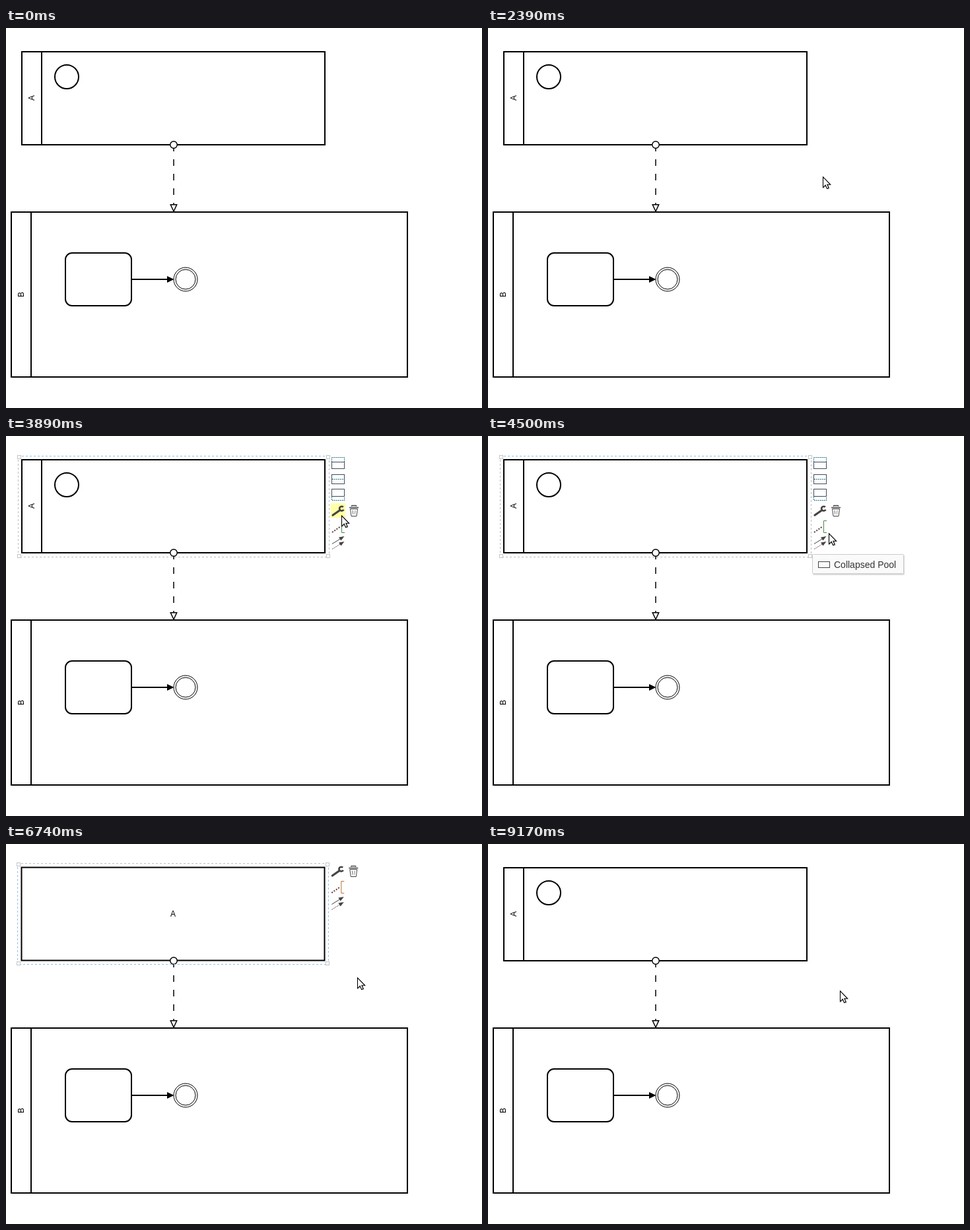
Animation, 721 px wide and 576 px high, one loop 9870 ms. Source, as an HTML page:

```html
<!DOCTYPE html>
<html lang="en">
<head>
<meta charset="utf-8">
<title>Collapsing a pool</title>
<style>
  html, body { margin: 0; width: 100%; height: 100%; overflow: hidden; background: #fff; }
  svg { display: block; width: 721px; height: 576px; }
  text { font-family: "Liberation Sans", Arial, sans-serif; font-size: 12px; }
  .shape { fill: #fff; stroke: #000; stroke-width: 2; }
  .thin { stroke-width: 1; }
  .flow { stroke-width: 1.5; }
  .outline { fill: none; stroke-dasharray: 3 3; shape-rendering: crispEdges; }
  .hover { stroke: #f88; }
  .blue { stroke: #8fc0ee; }
  .gray { stroke: #b9bcc0; }
  .handle { fill: #fff; stroke: #c4c4c4; shape-rendering: crispEdges; }
  .icon { fill: none; stroke: #444; }
  .lane { stroke: #3f4c5c; shape-rendering: crispEdges; }
  .dots { stroke: #257080; stroke-dasharray: 2 1; }
  .mark { fill: #ffffa6; }
  .popup { fill: #fafafa; stroke: #ccc; }
  .label { font-size: 14px; fill: #333; }
</style>
</head>
<body>
<svg viewBox="0 0 721 576">
  <defs>
    <g id="handles" class="handle">
      <rect x="17.5" y="29.5" width="5" height="5"/>
      <rect x="485.5" y="29.5" width="5" height="5"/>
      <rect x="17.5" y="179.5" width="5" height="5"/>
      <rect x="485.5" y="179.5" width="5" height="5"/>
    </g>
    <path id="topEdge" d="M18 30.5H490"/>
    <path id="otherEdges" d="M18.5 30V183.5H489.5V30"/>
    <g id="tools" class="icon">
      <path d="M495 120L505 113" stroke-width="3.2" stroke-linecap="round"/>
      <path d="M510.8 107.7A3.3 3.3 0 1 0 511.4 111.6" stroke-width="2.7"/>
      <path d="M520 108.5H534M523 106.5L524 105.5H530L531 106.5" stroke-width="1.7"/>
      <path d="M521.5 110.5L523 121.5H531L532.5 110.5Z"/>
      <path d="M525 112.5L525.7 118.5" stroke="#4a70a8"/>
      <path d="M529 112.5L528.3 118.5" stroke="#b87a38"/>
      <path d="M494 146L507 137" stroke="#5a3a36" stroke-width="2" stroke-dasharray="2 2"/>
      <path d="M494 163.5L507 155.5"/>
      <path d="M494 171.5L507 163.5" stroke="#7a5248" stroke-dasharray="2 1"/>
      <path d="M512.5 152L504 153.5L507.5 158.5ZM512.5 160L504 161.5L507.5 166.5Z" fill="#444" stroke="none"/>
    </g>
    <path id="bracket" d="M513 128.5H508.5V146.5H513" fill="none"/>
  </defs>

  <g data-show="0-6740 9170-9870">
    <rect class="shape" x="24" y="36" width="459" height="141"/>
    <path class="shape" d="M54 36V177"/>
    <circle class="shape" cx="92" cy="74" r="18"/>
    <text transform="translate(43 106) rotate(-90)" text-anchor="middle">A</text>
  </g>
  <g data-show="6740-9170">
    <rect class="shape" x="23.5" y="35.5" width="459" height="141"/>
    <text x="253" y="110" text-anchor="middle">A</text>
  </g>

  <rect class="shape" x="8" y="279" width="600" height="250"/>
  <path class="shape" d="M38 279V529"/>
  <text transform="translate(27 404) rotate(-90)" text-anchor="middle">B</text>
  <rect class="shape" x="90" y="341" width="100" height="80" rx="10"/>
  <path class="shape" d="M190 381H246"/>
  <path d="M244 376L254.5 381L244 386Z"/>
  <circle class="shape thin" cx="272" cy="381" r="18"/>
  <circle class="shape thin" cx="272" cy="381" r="15"/>

  <path class="shape flow" d="M254 177V278" stroke-dasharray="10 12"/>
  <circle class="shape flow" cx="254" cy="177" r="5.25"/>
  <path class="shape flow" d="M249.3 267.8H258.7L254 278Z"/>

  <rect class="outline hover" x="2.5" y="273.5" width="611" height="262" data-show="1160-2350"/>
  <rect class="outline hover" x="18.5" y="30.5" width="471" height="153" data-show="2470-3490"/>
  <g class="outline" data-show="3490-6740">
    <use href="#topEdge" class="blue"/><use href="#otherEdges" class="gray"/>
  </g>
  <use href="#handles" data-show="2830-6740"/>
  <g class="outline" transform="translate(-1 -1)" data-show="6740-7730">
    <use href="#topEdge" class="gray"/><use href="#otherEdges" class="blue"/>
    <use href="#handles" stroke-dasharray="none"/>
  </g>

  <rect class="mark" x="492" y="102" width="22" height="22" data-show="3490-4380"/>
  <rect class="mark" x="492" y="126" width="22" height="22" data-show="4420-4500"/>
  <g data-show="2830-6740">
    <g class="icon lane">
      <path d="M493.5 39.5H512.5V49.5H493.5ZM493.5 58.5H512.5V72.5H493.5ZM493.5 80.5H512.5V91.5H493.5Z"/>
      <path class="dots" d="M493.5 39V32.5H512.5V39M494 65.5H512M493.5 92V97.5H512.5V92"/>
    </g>
    <use href="#tools"/>
    <use href="#bracket" stroke="#4b8745"/>
  </g>
  <g transform="translate(-.7 -72)" data-show="6740-7730">
    <use href="#tools"/>
    <use href="#bracket" stroke="#b9742f"/>
  </g>

  <g data-show="4040-6740">
    <rect x="492" y="180" width="139" height="31" rx="2" fill="#ddd"/>
    <rect class="popup" x="491.5" y="179.5" width="138" height="29" rx="1"/>
    <rect class="mark" x="493" y="181" width="136" height="27" data-show="4660-6740"/>
    <rect class="icon" x="500.5" y="190.5" width="17" height="9"/>
    <text class="label" x="524" y="200">Collapsed Pool</text>
  </g>

  <g id="cursor" data-show="710-9870">
    <path d="M1.5 2V18.5L5.3 15L7.6 19.6H10.5L8.8 13.5H13Z" fill="#000" opacity=".2"/>
    <path d="M.5 .8V16.8L4.2 13.3L6.6 18.5L9.2 17.4L6.9 12.3H11.6Z" fill="#fff" stroke="#000" stroke-width="1.1"/>
  </g>
</svg>
<script>
  const LOOP = 9870, STEP = 40;
  const smooth = u => u * u * (3 - 2 * u);
  const speedUp = u => u ** 2.1;

  // The pointer jumps once per STEP, starting at each move's time.
  const moves = [
    { at: 0, steps: 1, to: [659, 437] },
    { at: 920, steps: 7, to: [601, 315], ease: speedUp },
    { at: 1610, steps: 1, to: [601, 314] },
    { at: 2270, steps: 8, to: [413, 136] },
    { at: 3250, steps: 9, to: [506, 120] },
    { at: 3890, steps: 1, to: [508, 120] },
    { at: 4340, steps: 13, to: [532, 202] },
    { at: 6850, steps: 4, to: [533, 222] }
  ];

  const cursor = document.getElementById("cursor");
  const timed = [...document.querySelectorAll("[data-show]")].map(node => ({
    node,
    spans: node.dataset.show.split(" ").map(span => span.split("-").map(Number))
  }));

  function pointerAt(time) {
    let i = moves.length - 1;
    while (moves[i].at > time) i--;
    const { at, steps, to, ease = smooth } = moves[i];
    const from = i ? moves[i - 1].to : to;
    const taken = Math.min(steps, Math.floor((time - at) / STEP) + 1);
    const part = ease(taken / steps);
    return from.map((start, axis) => Math.round(start + (to[axis] - start) * part));
  }

  function draw() {
    const time = performance.now() % LOOP;
    for (const { node, spans } of timed) {
      const on = spans.some(([start, end]) => time >= start && time < end);
      node.style.display = on ? "" : "none";
    }
    cursor.setAttribute("transform", `translate(${pointerAt(time)})`);
    requestAnimationFrame(draw);
  }
  draw();
</script>
</body>
</html>
```
